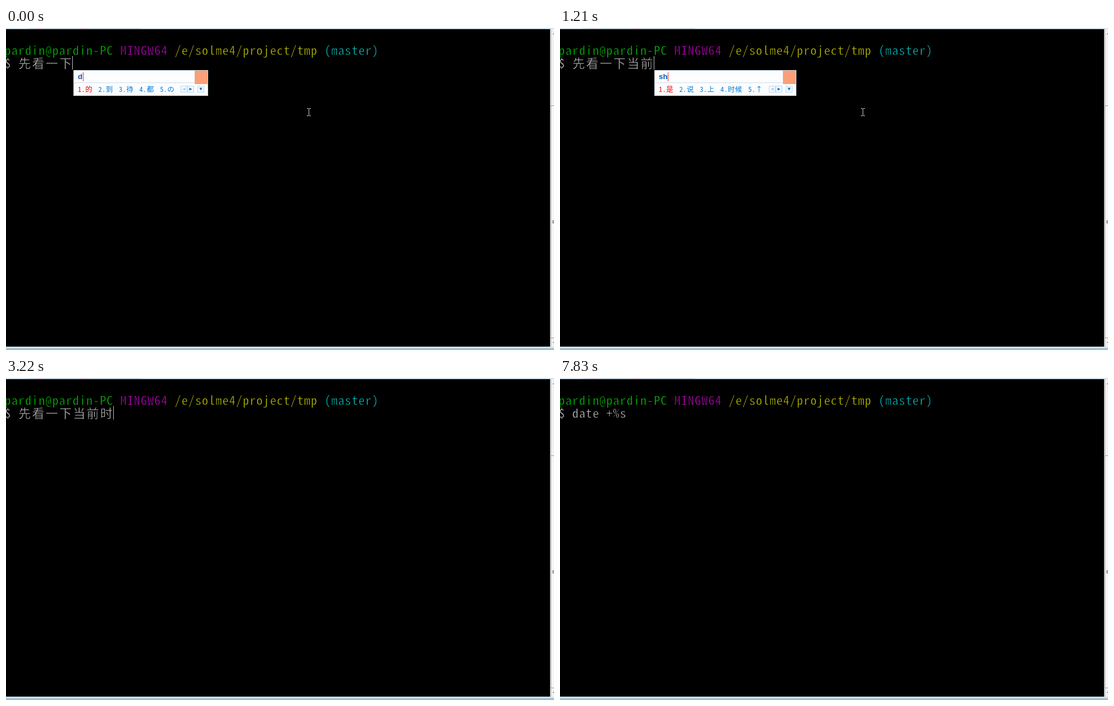
These frames come from a looping animation (976 by 574 pixels, 8000 ms). An HTML page with a canvas:

```html
<!DOCTYPE html>
<html lang="zh">
<head>
<meta charset="utf-8">
<style>
html, body { margin: 0; width: 976px; height: 574px; overflow: hidden; background: #000; }
canvas { display: block; }
</style>
</head>
<body>
<canvas id="stage" width="976" height="574"></canvas>
<script>
const ctx = document.getElementById('stage').getContext('2d');
const LOOP = 8000, CELL = 12.12, LEFT = -3;
const MONO = '"Noto Sans Mono CJK SC", "Noto Sans CJK SC", "Liberation Mono", monospace';

// start time, typed text, caret shown, pinyin, candidates
const steps = [
  [0, '先看一下', 1, 'd', '的 到 待 都 の'],
  [150, '先看一下', 1, 'da', '大 打 大家 达 大概'],
  [400, '先看一下', 0, 'da', '大 打 大家 达 大概'],
  [520, '先看一下', 0, 'dan', '但 但是 单位 担心 单独'],
  [670, '先看一下', 0, 'dang', '当 党 档 挡 荡'],
  [790, '先看一下', 0, "dang'qian", '当前 当 党 档 挡'],
  [940, '先看一下当前', 1],
  [1210, '先看一下当前', 1, 'sh', '是 说 上 时候 ↑'],
  [1330, '先看一下当前', 1, 'shi', '是 时 事 使 十'],
  [1450, '先看一下当前', 0, "shi'j", '时间 世界 实际 事件 时机'],
  [1600, '先看一下当前', 0, "shi'ji", '实际 时机 世纪 事迹 试剂'],
  [1750, '先看一下当前', 0, "shi'jian", '时间 事件 实践 世间 时见'],
  [1900, '先看一下当前时间', 1],
  [2420, '先看一下当前时间', 0],
  [2970, '先看一下当前时间', 1],
  [3220, '先看一下当前时', 1],
  [3750, '先看一下当前时', 0],
  [3900, '先看一', 1],
  [4050, '', 1],
  [4740, '', 0],
  [5360, '', 1],
  [5510, 'da', 1],
  [5820, 'date', 1],
  [6280, 'date ', 1],
  [6600, 'date +', 1],
  [7060, 'date +%', 1],
  [7210, 'date +%s', 1],
  [7830, 'date +%s', 0]
];

function rect(x, y, w, h, color) {
  ctx.fillStyle = color;
  ctx.fillRect(x, y, w, h);
}

// Centres each character in its grid cell, wide ones taking two; returns the end x.
function write(text, x, y, cell, size, color, thin) {
  ctx.font = `${size}px ${MONO}`;
  ctx.textAlign = 'center';
  ctx.fillStyle = color;
  ctx.strokeStyle = '#000';
  ctx.lineWidth = 0.5;
  for (const ch of text) {
    const w = ch > '\xff' ? cell * 2 : cell;
    ctx.fillText(ch, x + w / 2, y);
    if (thin) ctx.strokeText(ch, x + w / 2, y); // black outline slims the strokes
    x += w;
  }
  ctx.textAlign = 'left';
  return x;
}

const shell = (text, x, y, color) => write(text, x, y, CELL, 22, color, true);

function triangle(x, y, dx, dy, color) {
  ctx.fillStyle = color;
  ctx.beginPath();
  ctx.moveTo(x + dx, y + dy);
  ctx.lineTo(x - dx + dy, y - dy + dx);
  ctx.lineTo(x - dx - dy, y - dy - dx);
  ctx.fill();
}

function button(x, dx, dy, color) {
  rect(x, 103, 12, 12, '#b9dcf5');
  rect(x + 1, 104, 10, 10, '#f3f9fe');
  triangle(x + 6, 109, dx, dy, color);
}

function popup(x, pinyin, words) {
  const list = words.split(' ');
  const w = 175 + 13 * list.join('').length, right = x + w;
  rect(x, 75, w, 46, '#c4d3e0');
  rect(x + 1, 76, w - 2, 44, '#fbfdff');
  rect(x + 1, 97, w - 26, 1, '#d3dde6');

  ctx.font = 'bold 13.33px "Liberation Sans", Arial, sans-serif';
  ctx.fillStyle = '#0a58b8';
  ctx.fillText(pinyin, x + 8, 91);
  rect(Math.round(x + 8.5 + ctx.measureText(pinyin).width), 79, 1, 16, '#ff2020');

  let at = x + 8;
  list.forEach((word, i) => {
    at = write(`${i + 1}.${word}`, at, 113.5, 6.5, 12.5, i ? '#0078d7' : '#f00000') + 10.5;
  });
  button(right - 49, -2.5, 0, '#a9cdea');
  button(right - 37, 2.5, 0, '#0070d0');
  button(right - 19, 0, 2.5, '#0070d0');
  rect(right - 24, 76, 23, 24, '#f9a078');
}

function windowFrame() {
  rect(0, 0, 976, 1, '#c6dcec');
  rect(40, 0, 200, 1, '#aebfd0');
  for (const x of [52, 132]) rect(x, 0, 12, 1, '#d0a0a8');
  rect(0, 1, 976, 1, '#dfeaf2');

  rect(969, 2, 7, 566, '#e9e9e9');
  rect(970, 2, 1, 566, '#aaa');
  rect(971, 2, 5, 566, '#f1f1f1');
  rect(970, 138, 6, 415, '#9a9a9a');
  rect(971, 139, 5, 413, '#f5f5f5');
  for (const y of [343, 345, 347]) rect(973, y, 3, 1, '#555');
  for (const y of [10, 560]) rect(974, y, 2, 1, '#555');

  rect(0, 568, 976, 1, '#e0edf6');
  rect(0, 569, 976, 3, '#c0dcf0');
  rect(0, 572, 976, 1, '#70858f');
  rect(0, 573, 976, 1, '#dce8f0');
}

function pointer() {
  const gray = '#d0d0d0';
  rect(539, 144, 1, 12, gray);
  for (const y of [143, 156]) {
    rect(536, y, 3, 1, gray);
    rect(540, y, 3, 1, gray);
  }
}

function draw(t) {
  const [, text, caret, pinyin, words] = steps.findLast(s => s[0] <= t);
  rect(0, 0, 976, 574, '#000');
  windowFrame();

  let x = shell('pardin@pardin-PC ', LEFT, 47.5, '#00bf00');
  x = shell('MINGW64 ', x, 47.5, '#bf00bf');
  x = shell('/e/solme4/project/tmp ', x, 47.5, '#bfbf00');
  shell('(master)', x, 47.5, '#00bfbf');

  const end = Math.round(shell('$ ' + text, LEFT, 71, '#bfbfbf'));
  if (caret) rect(end, 50, 1, 24, '#bfbfbf');
  if (t < 3220) pointer();
  if (pinyin) popup(end + (text.length > 4 ? 1 : 2), pinyin, words);
}

const start = performance.now();
function tick() {
  draw((performance.now() - start) % LOOP);
  requestAnimationFrame(tick);
}
tick();
</script>
</body>
</html>
```
